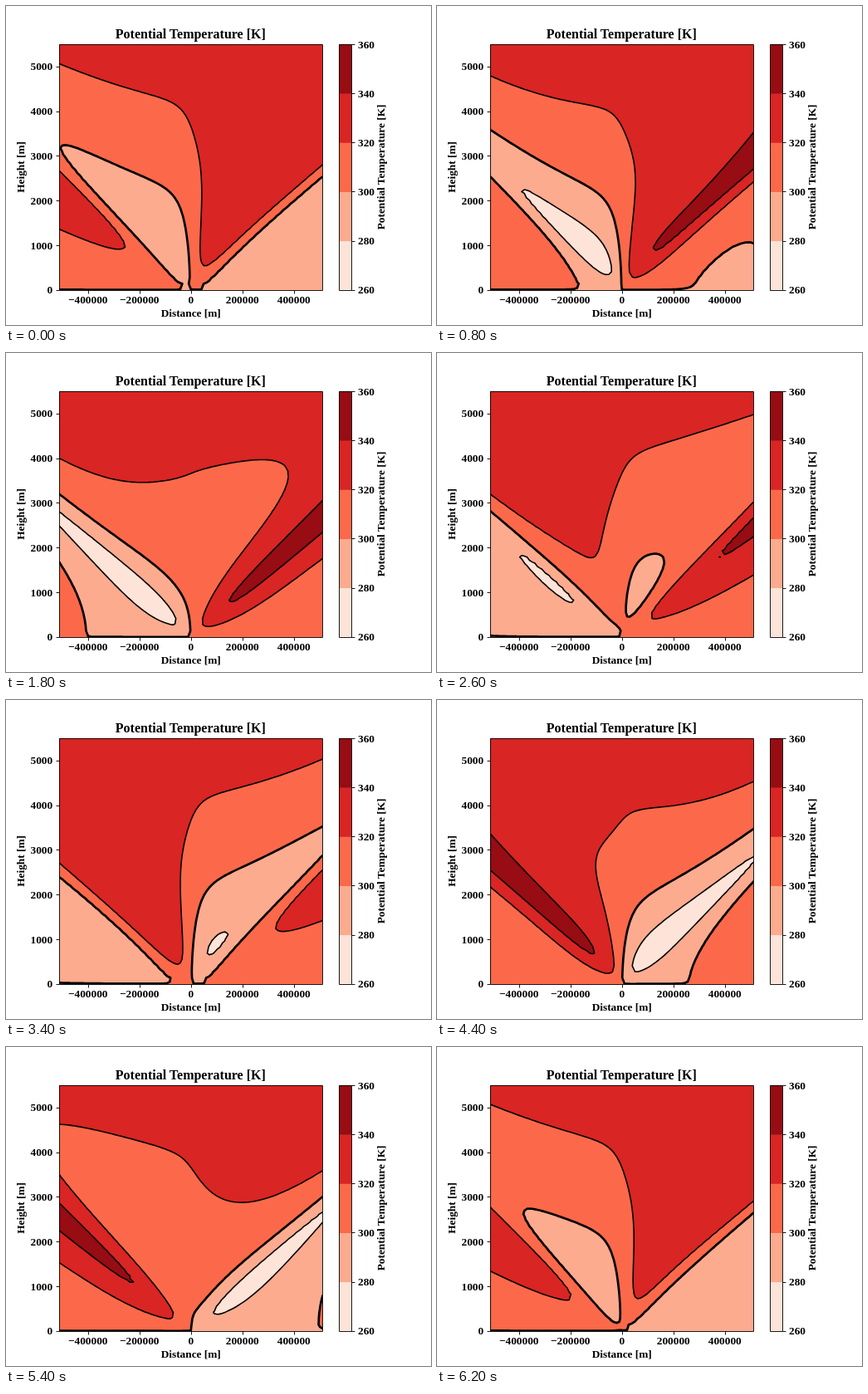
An HTML page with a canvas that plays this animation: 512 by 384 pixels, repeating every 6.4 s.

```html
<!DOCTYPE html>
<html lang="en">
<meta charset="utf-8">
<title>Potential Temperature</title>
<style>
  html, body { margin: 0; width: 100%; height: 100%; overflow: hidden; background: #fff; }
  canvas, svg { position: absolute; left: 0; top: 0; }
  text { font: bold 13.33px "Liberation Serif", "Times New Roman", serif; }
  .mid { text-anchor: middle; }
  .end { text-anchor: end; }
  .title { font-size: 16px; }
  .axes { fill: none; stroke: #000; stroke-width: .9; }
</style>
<canvas id="plot" width="512" height="384"></canvas>
<svg id="axes" width="512" height="384"></svg>
<script>
const LEFT = 64, TOP = 46.08, W = 317.44, H = 295.68, BOTTOM = TOP + H;
const XMAX = 512e3, ZMAX = 5500, NX = 100, NZ = 40;
const COLORS = ['#fee4d8', '#fcab8f', '#fb694a', '#d92523', '#980c13'];
const STEP = 200, STEPS = 32;

// Linear sea-breeze waves: a pair of beams leaving the coast at x = 0.
const DEPTH = 1370, BEAM = 2695 / DEPTH, SPREAD = .192, AMP = 55.3, LAG = .11, LAPSE = 20 / 3660;

const plot = document.getElementById('plot'), axes = document.getElementById('axes');
const clamp = (v, lo, hi) => Math.max(lo, Math.min(hi, v));
const snap = v => Math.round(v) + .5;

// Cosine and sine transforms of k exp(-k SPREAD) / (1 + k²)
function transform(x) {
  let c = 0, s = 0;
  for (let k = .05; k < 50; k += .1) {
    const f = .1 * k * Math.exp(-k * SPREAD) / (1 + k * k);
    c += f * Math.cos(k * x);
    s += f * Math.sin(k * x);
  }
  return [c, s];
}

const sinPart = [], cosPart = [], theta = [];
const at = (i, j) => i * (NZ + 1) + j;
for (let i = 0; i <= NX; i++) {
  const x = (2 * i / NX - 1) * BEAM, s0 = transform(x)[1];
  for (let j = 0; j <= NZ; j++) {
    const z = j / NZ * ZMAX / DEPTH;
    const [c1, s1] = transform(x - z), [c2, s2] = transform(x + z);
    sinPart.push(AMP * (c1 - c2) / 2);
    cosPart.push(AMP * (Math.exp(-z) * s0 - (s1 + s2) / 2));
  }
}

function solve(phase) {
  const s = Math.sin(phase), c = Math.cos(phase);
  for (let i = 0; i <= NX; i++) for (let j = 0; j <= NZ; j++) {
    const n = at(i, j);
    theta[n] = j ? 300 + LAPSE * j / NZ * ZMAX + s * sinPart[n] + c * cosPart[n] : 300 - .1 * c;
  }
}

const ctx = plot.getContext('2d');
const image = ctx.createImageData(317, 296);
const pixels = new Uint32Array(image.data.buffer);
const packed = COLORS.map(c => parseInt('ff' + c.slice(5) + c.slice(3, 5) + c.slice(1, 3), 16));

function fillBands() {
  for (let py = 0; py < image.height; py++) {
    const v = clamp((BOTTOM - 46.5 - py) / H * NZ, 0, NZ - .001), j = Math.floor(v), g = v - j;
    for (let px = 0; px < image.width; px++) {
      const u = (px + .5) / W * NX, i = Math.floor(u), f = u - i, n = at(i, j), m = at(i + 1, j);
      const t = (1 - f) * (theta[n] * (1 - g) + theta[n + 1] * g) + f * (theta[m] * (1 - g) + theta[m + 1] * g);
      pixels[py * image.width + px] = packed[clamp(Math.floor((t - 260) / 20), 0, 4)];
    }
  }
  ctx.putImageData(image, LEFT, 46);
}

function strokeLevel(level, width) {
  ctx.beginPath();
  for (let i = 0; i < NX; i++) for (let j = 0; j < NZ; j++) {
    const corners = [[i, j], [i + 1, j], [i + 1, j + 1], [i, j + 1]];
    const vals = corners.map(([p, q]) => theta[at(p, q)] - level);
    const hits = [];
    corners.forEach(([p, q], e) => {
      const o = (e + 1) % 4, [p2, q2] = corners[o];
      if (vals[e] < 0 === vals[o] < 0) return;
      const f = vals[e] / (vals[e] - vals[o]);
      hits.push([LEFT + (p + f * (p2 - p)) / NX * W, BOTTOM - (q + f * (q2 - q)) / NZ * H]);
    });
    // In a saddle cell the mean decides which corners are cut off.
    const mean = vals[0] + vals[1] + vals[2] + vals[3];
    if (hits.length === 4 && vals[0] < 0 !== mean < 0) hits.push(hits.shift());
    for (let k = 0; k < hits.length; k += 2) {
      ctx.moveTo(...hits[k]);
      ctx.lineTo(...hits[k + 1]);
    }
  }
  ctx.lineWidth = width;
  ctx.stroke();
}

function draw(step) {
  solve(2 * Math.PI * step / STEPS - LAG);
  ctx.clearRect(0, 0, 512, 384);
  fillBands();
  ctx.save();
  ctx.beginPath();
  ctx.rect(LEFT, 46, 317, 296);
  ctx.clip();
  ctx.lineCap = 'round';
  for (const level of [280, 300, 320, 340]) strokeLevel(level, level === 300 ? 2.7 : 1.6);
  ctx.restore();
}

function drawAxes() {
  const barX = 401.3, barR = 416.1, mid = LEFT + W / 2, midY = TOP + H / 2;
  const box = (l, r) => `M${snap(l)} ${snap(TOP)}H${snap(r)}V${snap(BOTTOM)}H${snap(l)}z`;
  let fills = '', lines = box(LEFT, LEFT + W) + box(barX, barR), texts = '';
  const label = (x, y, str, cls = '', extra = '') => texts += `<text x="${x}" y="${y}" class="${cls}" ${extra}>${str}</text>`;
  const upright = (x, str) => label(0, 0, str, 'mid', `transform="translate(${x} ${midY}) rotate(-90)"`);
  for (let v = -400000; v <= 400000; v += 200000) {
    const x = mid + v / XMAX * W / 2;
    lines += `M${snap(x)} ${snap(BOTTOM)}v4`;
    label(x, 358.3, String(v).replace('-', '−'), 'mid');
  }
  for (let v = 0; v <= 5000; v += 1000) {
    const y = BOTTOM - v / ZMAX * H;
    lines += `M${snap(LEFT)} ${snap(y)}h-4`;
    label(56.2, y + 4.5, v, 'end');
  }
  for (let n = 0; n <= 5; n++) {
    const y = BOTTOM - n / 5 * H;
    lines += `M${snap(barR)} ${snap(y)}h4`;
    label(424, y + 4.5, 260 + 20 * n);
    if (n < 5) fills += `<rect x="${barX}" y="${y - H / 5}" width="${barR - barX}" height="${H / 5 + (n ? .5 : 0)}" fill="${COLORS[n]}"/>`;
  }
  label(mid - .4, 39, 'Potential Temperature [K]', 'mid title');
  label(mid, 374, 'Distance [m]', 'mid');
  upright(21.7, 'Height [m]');
  upright(456.3, 'Potential Temperature [K]');
  axes.innerHTML = `${fills}<path class="axes" d="${lines}"/>${texts}`;
}

let shown = 0;
function tick(now) {
  const step = Math.floor(now / STEP) % STEPS;
  if (step !== shown) draw(shown = step);
  requestAnimationFrame(tick);
}
drawAxes();
draw(shown);
requestAnimationFrame(tick);
</script>
</html>
```
